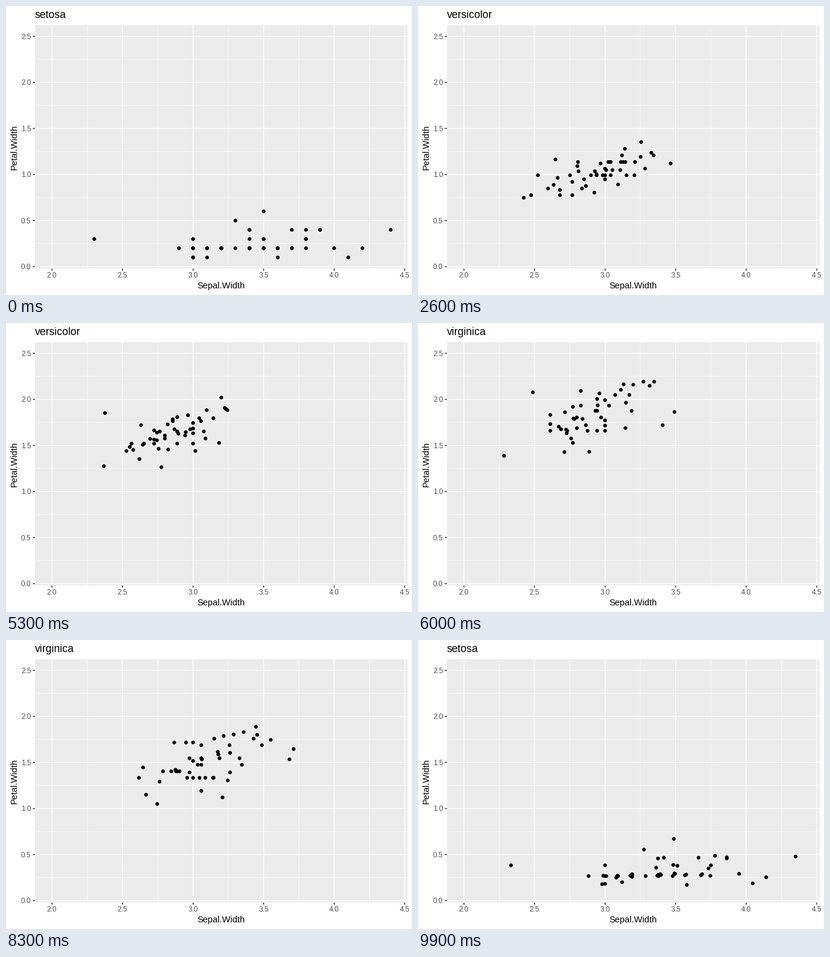
Write a matplotlib script that moves like this. It is 672 by 480 pixels and loops after 10000 ms.

```python
import numpy as np
import matplotlib.pyplot as plt
from matplotlib.animation import FuncAnimation
from matplotlib.collections import EllipseCollection
from matplotlib.patches import Rectangle

plt.rcParams["font.family"] = "Liberation Sans"

W, H, DPI = 672, 480, 96
LEFT, RIGHT, TOP, BOTTOM = 48.0, 664.7, 32.0, 436.0
X_MIN, X_MAX = 1.88, 4.52
Y_MIN, Y_MAX = -0.02, 2.62
FRAMES, INTERVAL = 100, 100
PX = 72 / DPI  # points per pixel
TICK = 3.67

# Sepal and petal widths in tenths, row by row for each species
SETOSA_SEPAL = [35, 30, 32, 31, 36, 39, 34, 34, 29, 31, 37, 34, 30, 30, 40, 44, 39,
                35, 38, 38, 34, 37, 36, 33, 34, 30, 34, 35, 34, 32, 31, 34, 41, 42,
                31, 32, 35, 36, 30, 34, 35, 23, 32, 35, 38, 30, 38, 32, 37, 33]
SETOSA_PETAL = [2, 2, 2, 2, 2, 4, 3, 2, 2, 1, 2, 2, 1, 1, 2, 4, 4,
                3, 3, 3, 2, 4, 2, 5, 2, 2, 4, 2, 2, 2, 2, 4, 1, 2,
                2, 2, 2, 1, 2, 2, 3, 3, 2, 6, 4, 3, 2, 2, 2, 2]
VERSICOLOR_SEPAL = [32, 32, 31, 23, 28, 28, 33, 24, 29, 27, 20, 30, 22, 29, 29, 31, 30,
                    27, 22, 25, 32, 28, 25, 28, 29, 30, 28, 30, 29, 26, 24, 24, 27, 27,
                    30, 34, 31, 23, 30, 25, 26, 30, 26, 23, 27, 30, 29, 29, 25, 28]
VERSICOLOR_PETAL = [14, 15, 15, 13, 15, 13, 16, 10, 13, 14, 10, 15, 10, 14, 13, 14, 15,
                    10, 15, 11, 18, 13, 15, 12, 13, 14, 14, 17, 15, 10, 11, 10, 12, 16,
                    15, 16, 15, 13, 13, 13, 12, 14, 12, 10, 13, 12, 13, 13, 11, 13]
VIRGINICA_SEPAL = [33, 27, 30, 29, 30, 30, 25, 29, 25, 36, 32, 27, 30, 25, 28, 32, 30,
                   38, 26, 22, 32, 28, 28, 27, 33, 32, 28, 30, 28, 30, 28, 38, 28, 28,
                   26, 30, 34, 31, 30, 31, 31, 31, 27, 32, 33, 30, 25, 30, 34, 30]
VIRGINICA_PETAL = [25, 19, 21, 18, 22, 21, 17, 18, 18, 25, 20, 19, 21, 20, 24, 23, 18,
                   22, 23, 15, 23, 20, 20, 18, 21, 18, 18, 18, 21, 16, 19, 20, 22, 15,
                   14, 23, 24, 18, 18, 21, 24, 23, 19, 23, 25, 23, 19, 20, 23, 18]


def to_x(value):
    return LEFT + (value - X_MIN) / (X_MAX - X_MIN) * (RIGHT - LEFT)


def to_y(value):
    return BOTTOM - (value - Y_MIN) / (Y_MAX - Y_MIN) * (BOTTOM - TOP)


def place(sepal, petal):
    return np.column_stack([to_x(np.array(sepal) / 10), to_y(np.array(petal) / 10)])


STATES = [
    ("setosa", place(SETOSA_SEPAL, SETOSA_PETAL)),
    ("versicolor", place(VERSICOLOR_SEPAL, VERSICOLOR_PETAL)),
    ("virginica", place(VIRGINICA_SEPAL, VIRGINICA_PETAL)),
]
# Frames at which each move departs and arrives
MOVES = [(8, 33), (42, 67), (76, 100)]

fig = plt.figure(figsize=(W / DPI, H / DPI), dpi=DPI, facecolor="white")
ax = fig.add_axes([0, 0, 1, 1])
ax.set_xlim(0, W)
ax.set_ylim(H, 0)
ax.axis("off")


def line(xs, ys, color, width, z):
    ax.plot(xs, ys, color=color, lw=width * PX, zorder=z,
            solid_capstyle="butt", snap=False, scalex=False, scaley=False)


def label(x, y, text, size, color="black", **kw):
    return ax.text(x, y, text, fontsize=size, color=color, va="baseline", **kw)


def draw_panel():
    ax.add_patch(Rectangle((LEFT, TOP), RIGHT - LEFT, BOTTOM - TOP,
                           fc="#EBEBEB", ec="none", snap=False, zorder=0))
    for x in np.arange(2.25, 4.5, 0.5):
        line([to_x(x)] * 2, [TOP, BOTTOM], "white", 0.71, 1)
    for y in np.arange(0.25, 2.5, 0.5):
        line([LEFT, RIGHT], [to_y(y)] * 2, "white", 0.71, 1)
    for x in np.arange(2, 4.6, 0.5):
        px = to_x(x)
        line([px, px], [TOP, BOTTOM], "white", 1.42, 2)
        line([px, px], [BOTTOM, BOTTOM + TICK], "#333333", 1.42, 2)
        label(px, 451, f"{x:.1f}", 8.8, "#4D4D4D", ha="center")
    for y in np.arange(0, 2.6, 0.5):
        py = to_y(y)
        line([LEFT, RIGHT], [py, py], "white", 1.42, 2)
        line([LEFT - TICK, LEFT], [py, py], "#333333", 1.42, 2)
        label(41.4, py + 4.2, f"{y:.1f}", 8.8, "#4D4D4D", ha="right")
    label((LEFT + RIGHT) / 2, 469, "Sepal.Width", 11, ha="center")
    label(18, (TOP + BOTTOM) / 2, "Petal.Width", 11, ha="center",
          rotation=90, rotation_mode="anchor")


draw_panel()
title = label(LEFT, 20, "setosa", 13.2, ha="left")
size = np.full(len(SETOSA_SEPAL), 6.15)
dots = EllipseCollection(size, size, np.zeros_like(size), units="xy",
                         offsets=STATES[0][1], offset_transform=ax.transData,
                         facecolors="black", edgecolors="none", zorder=3)
ax.add_collection(dots, autolim=False)


def update(frame):
    k = next(i for i, (_, arrive) in enumerate(MOVES) if frame < arrive)
    depart, arrive = MOVES[k]
    t = max(0, (frame - depart) / (arrive - depart))
    (name_a, a), (name_b, b) = STATES[k], STATES[(k + 1) % len(STATES)]
    dots.set_offsets(a + (b - a) * t)
    title.set_text(name_a if t < 0.5 else name_b)
    return dots, title


anim = FuncAnimation(fig, update, frames=FRAMES, interval=INTERVAL,
                     repeat=True, repeat_delay=0, blit=False)
plt.show()
```
